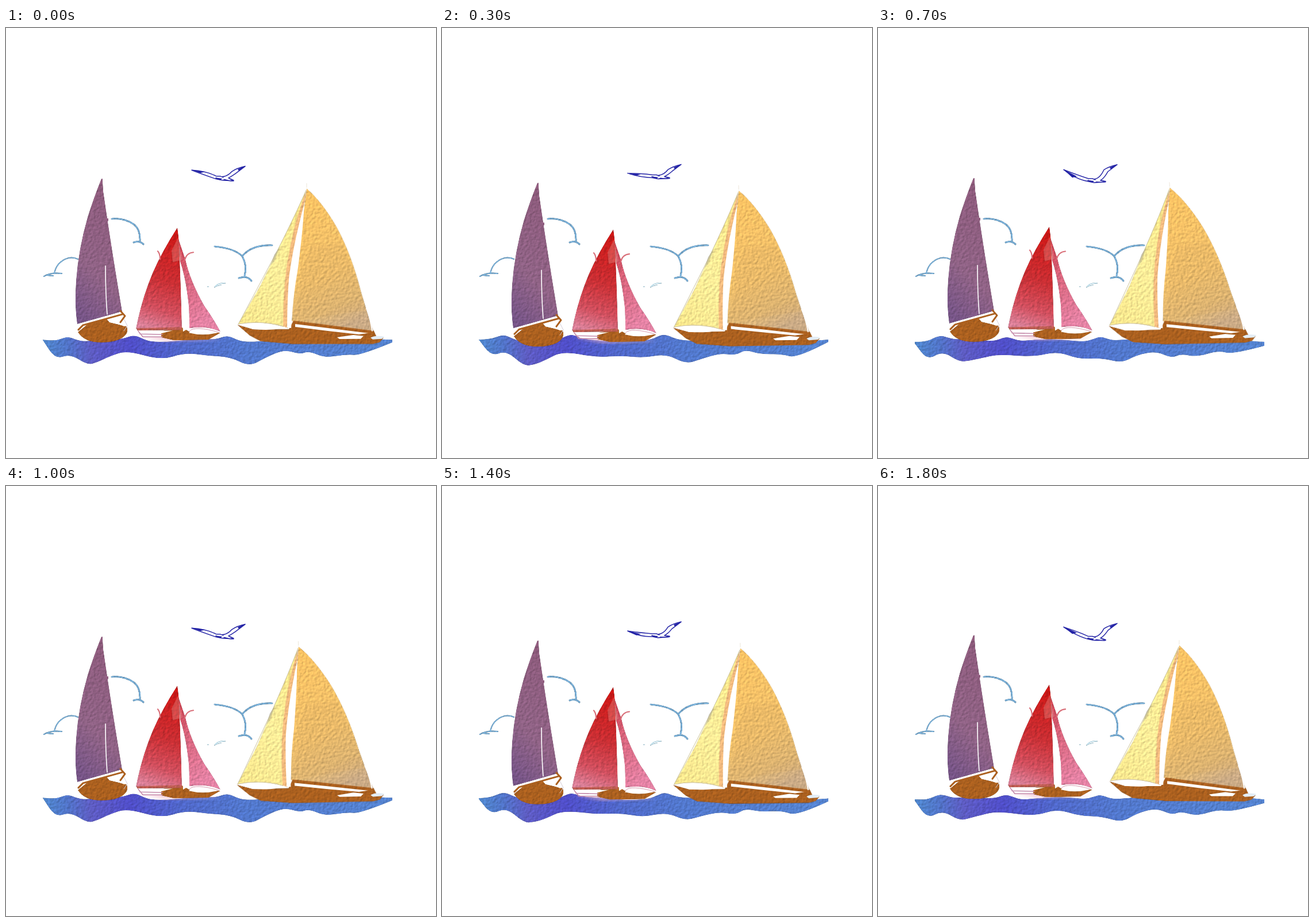
Recreate the animation shown at these times as an HTML page. Size 748x748 px, loop 1.9 s.

```html
<!DOCTYPE html>
<html lang="en">
<head>
<meta charset="utf-8">
<title>Sailing boats</title>
<style>
  html, body { margin: 0; width: 100%; height: 100%; overflow: hidden; background: #fff; }
  svg { display: block; width: 100vw; height: 100vh; }
  .line { fill: none; stroke-linecap: round; stroke-linejoin: round; }
  .gull { stroke: #76abd2; stroke-width: 3.2; }
  .wood { fill: #ab601f; }
  .spar { stroke: #ab601f; stroke-width: 3; }
  .white { fill: #fff; }
</style>
</head>
<body>
<svg viewBox="0 0 748 748">
  <defs>
    <filter id="grain" x="-2%" y="-2%" width="104%" height="104%" color-interpolation-filters="sRGB">
      <feTurbulence type="fractalNoise" baseFrequency=".2" numOctaves="2" seed="4"/>
      <feDiffuseLighting surfaceScale=".6" diffuseConstant=".92" lighting-color="#fff" result="light">
        <feDistantLight azimuth="225" elevation="55"/>
      </feDiffuseLighting>
      <feComposite in="SourceGraphic" in2="light" operator="arithmetic" k1="1.33"/>
      <feComposite in2="SourceAlpha" operator="in"/>
    </filter>
    <filter id="soft"><feGaussianBlur stdDeviation="3"/></filter>
    <linearGradient id="water" gradientUnits="userSpaceOnUse" x1="64" x2="672">
      <stop offset="0" stop-color="#5088ce"/>
      <stop offset=".07" stop-color="#5174c8"/>
      <stop offset=".14" stop-color="#5e5cc3"/>
      <stop offset=".25" stop-color="#504ec9"/>
      <stop offset=".4" stop-color="#5068ca"/>
      <stop offset=".58" stop-color="#5278cd"/>
      <stop offset="1" stop-color="#5584d1"/>
    </linearGradient>
    <linearGradient id="plum" x1=".6" y1="0" x2=".3" y2="1">
      <stop offset="0" stop-color="#8e5b7c"/>
      <stop offset=".65" stop-color="#906386"/>
      <stop offset="1" stop-color="#775587"/>
    </linearGradient>
    <linearGradient id="red" x1=".55" y1="0" x2=".4" y2="1">
      <stop offset="0" stop-color="#cb1715"/>
      <stop offset=".5" stop-color="#ca2f34"/>
      <stop offset=".8" stop-color="#d1505f"/>
      <stop offset="1" stop-color="#da8098"/>
    </linearGradient>
    <linearGradient id="pink" x1="0" y1="0" x2=".3" y2="1">
      <stop offset="0" stop-color="#cb3a47"/>
      <stop offset=".4" stop-color="#d8637a"/>
      <stop offset="1" stop-color="#e583a5"/>
    </linearGradient>
    <linearGradient id="gold" x1=".2" y1="0" x2=".45" y2="1">
      <stop offset="0" stop-color="#fcc463"/>
      <stop offset=".6" stop-color="#f0c06b"/>
      <stop offset=".85" stop-color="#dfb776"/>
      <stop offset="1" stop-color="#cbab86"/>
    </linearGradient>
    <linearGradient id="cream" x1="1" y1="0" x2="0" y2="1">
      <stop offset="0" stop-color="#fae486"/>
      <stop offset=".5" stop-color="#fcee9a"/>
      <stop offset="1" stop-color="#f8e68c"/>
    </linearGradient>
  </defs>

  <g class="line gull" filter="url(#grain)">
    <path d="M184 332Q206 330 223 342Q234 351 233 371M222 373Q232 369 239 376"/>
    <path d="M66 432Q77 425 97 427M71 430L82 431M84 427Q87 410 103 402Q114 397 125 402" stroke-width="2.4"/>
    <path d="M363 380Q397 383 411 397Q427 377 463 378M411 397Q420 414 415 431M405 435Q420 430 427 440"/>
    <path d="M363 451Q367 443 381 444M366 449L374 447M351 450h1" stroke="#c2e4f1" stroke-width="1.8"/>
  </g>

  <path id="bird" class="line" stroke="#2a2aa8" stroke-width="1.5"/>
  <path id="tips" fill="#2222a6"/>

  <path id="sea" fill="url(#water)" filter="url(#grain)"/>

  <g id="plumBoat">
    <g filter="url(#grain)">
      <path fill="url(#plum)" d="M166 263Q169 270 169 284Q176 332 185 390Q193 440 202 494L174 502L124 516Q119 485 122 440Q126 385 142 330Q153 295 166 263Z"/>
      <path class="wood" d="M125 530L141 517L174 506L180 513L210 520Q214 531 205 538Q193 548 166 548Q136 548 125 530Z"/>
    </g>
    <path class="line" d="M173 415Q173 460 176 499" stroke="#fff" stroke-width="1.6"/>
    <path class="white" d="M125 517L174 502L201 496L174 506L140 515L126 521Z"/>
    <path class="white" d="M178 509L199 503L209 518L206 520L186 513Z"/>
    <path class="line" d="M205 507L211 519L205 528" stroke="#d4ccd6" stroke-width="1"/>
    <path class="line spar" d="M126 526L134 518L174 507L203 499M199 493L207 502L199 513"/>
    <path class="line" d="M177 333v3M167 264v5" stroke="#8e5b7c" stroke-width="2"/>
  </g>

  <g id="redBoat">
    <path d="M232 534L275 530L350 537L372 540L280 544Z" fill="#eeb4c8" opacity=".6" filter="url(#soft)"/>
    <path class="white" d="M228 523L272 523V537L240 535Z"/>
    <g filter="url(#grain)">
      <path fill="url(#red)" d="M298 346Q300 358 301 374Q304 440 306 521L226 522Q236 470 255 425Q271 388 298 346Z"/>
      <path fill="url(#pink)" d="M300 366L312 401Q320 438 345 482Q362 506 373 527Q350 516 319 521Q319 455 303 405Z"/>
      <path class="wood" d="M270 526L307 520L319 527L373 529L352 541L292 542L270 537Z"/>
      <path d="M227 521L306 519V524L228 525Z" fill="#bd5c52"/>
    </g>
    <path d="M299 364L307 402L290 406L288 386Z" fill="#e79a96" opacity=".35"/>
    <path class="line" d="M264 387Q268 391 268 401M326 389Q314 390 311 402" stroke="#d9707a" stroke-width="2.2"/>
    <path class="white" d="M303 408Q311 430 318 482L319 520L308 527L305 470Z"/>
    <path class="white" d="M318 529Q327 515 368 529Q342 535 318 529ZM240 527L290 525L270 530Z"/>
    <path class="line" d="M230 526L238 536L272 536M233 531L272 532" stroke="#c48aaa" stroke-width="1.6"/>
    <path class="line" d="M319 526Q328 516 370 528" stroke="#d69cae" stroke-width="1"/>
  </g>

  <g id="goldBoat">
    <g filter="url(#grain)">
      <path fill="url(#cream)" d="M521 281Q504 321 472 385L442 447L404 514Q445 507 484 519L490 430Q500 350 521 281Z"/>
      <path fill="#f3bb7f" d="M521 283Q501 335 491 395Q482 440 482 518L491 521Q490 430 506 360L519 300Z"/>
      <path fill="url(#gold)" d="M522 278Q549 301 575 346Q601 394 618 460Q629 497 641 531L497 509Q501 420 513 350Z"/>
      <path fill="#d2a45f" opacity=".22" d="M530 378L583 374Q605 420 626 490L500 508Q510 435 530 378Z"/>
      <path class="wood" d="M402 515L430 523L492 523L500 508L640 526L645 537L657 538L650 546L638 549L500 549L443 544L424 534Z"/>
    </g>
    <path class="line" d="M521 281Q504 321 472 385L404 514" stroke="#c4b98a" stroke-width=".8"/>
    <path d="M477 378L466 405L460 411L466 393Z" fill="#9b9580" opacity=".4"/>
    <path class="white" d="M518 305Q516 350 507 420Q499 465 496 521L489 520Q489 470 492 432Q499 375 518 305Z"/>
    <path class="white" d="M406 514Q444 508 481 519Q472 526 430 523Z"/>
    <path class="line" d="M404 514Q445 507 482 518" stroke="#d0c4a0" stroke-width="1"/>
    <path class="white" d="M503 514L560 521L630 530L614 532L560 526L503 519Z"/>
    <path class="white" d="M576 537L604 533L622 535L617 540L580 540Z"/>
    <path class="line" d="M627 487Q634 505 637 526" stroke="#fff" stroke-width="2"/>
    <path d="M634 538Q642 533 658 536L654 540L638 541Z" fill="#e3edf6"/>
    <path class="line" d="M522 269v7" stroke="#ece6da" stroke-width="1"/>
  </g>
</svg>
<script>
const STEP = 100, FRAMES = 19, CYCLE = 10;
const LEFT = 64, RIGHT = 672, WAVELENGTH = 152;
const $ = id => document.getElementById(id);

// Swings around mid and peaks at the given step of the cycle.
const swing = (t, mid, size, peak, period = CYCLE) =>
  mid + size * Math.cos(2 * Math.PI * (t - peak) / period);

// Ripple that travels to the right along the water.
const ripple = (x, p, size) => swing(p, 0, size, CYCLE * (x - 115) / WAVELENGTH);

// Smooth curve that runs through the midpoints of a polyline.
function curve(pts) {
  let d = `L${pts[0]}`;
  for (let i = 1; i < pts.length - 1; i++) {
    const [x, y] = pts[i], [u, v] = pts[i + 1];
    d += `Q${x} ${y} ${(x + u) / 2} ${(y + v) / 2}`;
  }
  return d + `L${pts.at(-1)}`;
}

const hump = (x, at) => Math.exp(-(((x - at) / 16) ** 2));
const crest = x => 543.5 - 8 * (hump(x, 108) + hump(x, 224) + hump(x, 386));

// Lower edge of the water at rest, right to left.
const shore = [
  [RIGHT, 549], [617, 571], [592, 565], [555, 571], [527, 563], [511, 571], [484, 563],
  [450, 573], [424, 585], [390, 571], [350, 574], [312, 566], [270, 574], [210, 564],
  [180, 575], [160, 582], [142, 585], [112, 563], [86, 575], [LEFT, 545]
];

function drawSea(p) {
  const top = [];
  for (let x = LEFT; x <= RIGHT; x += 8) top.push([x, crest(x) + ripple(x, p, 2.2)]);
  const bottom = shore.map(([x, y]) => [x, y + ripple(x, p, 4)]);
  $('sea').setAttribute('d', 'M' + curve(top).slice(1) + curve(bottom) + 'Z');
}

function drawBird(p) {
  const l = swing(p, 249, 3.7, 3.3);
  const e = swing(p, 254, 5, 5.6);
  const r = swing(p, 238.3, 2.3, 9.9);
  const b = swing(p, 260.5, 3.5, 7.2);
  const tail = swing(p, 265, 3.4, 8);
  $('bird').setAttribute('d',
    `M323 ${l}Q348 ${e - 1} 366 ${b - 2}L373 ${b - 2}L378 ${b}` +
    `M323 ${l}Q344 ${e + 6} 366 ${b + 3}L376 ${b + 5}L396 ${tail}L387 ${b + 1}` +
    `M376 ${b - 1}Q386 ${b - 2} 393 ${r + 9}Q402 ${r + 3} 416 ${r}` +
    `Q404 ${r + 9} 400 ${r + 12}Q393 ${b - 2} 387 ${b + 1}L396 ${tail - 1}` +
    `M365 ${b + 1}L372 ${b + 3}`);
  $('tips').setAttribute('d',
    `M322 ${l - 1}Q334 ${(l + e) / 2} 346 ${e + 1}L338 ${e + 3}Z` +
    `M417 ${r - 1}L403 ${r + 5}L405 ${r + 8}Z` +
    `M364 ${b + 1}L376 ${b + 2}L373 ${b + 5}ZM396 ${tail + 1}L380 ${b + 3}L376 ${b + 5}Z`);
}

// Leans the big boat to the left while the bow dips.
function leanBoat(f, p) {
  const lean = swing(f, 6.5, 8.5, 8, FRAMES);
  const bob = swing(p, 2, 2.8, 2.9);
  const k = lean / 257;
  const b = (-0.4 * bob - 0.35 * lean) / 239;
  const c = (0.25 * lean + 120 * b) / 237;
  const m = [1, b, k, 1 + c, -535 * k, bob - 522 * b - 278 * c];
  $('goldBoat').setAttribute('transform', `matrix(${m})`);
}

const lift = (id, y) => $(id).setAttribute('transform', `translate(0 ${y})`);

let shown = -1;
function tick() {
  const f = Math.floor(performance.now() / STEP) % FRAMES;
  if (f !== shown) {
    shown = f;
    const p = f % CYCLE;
    drawSea(p);
    drawBird(p);
    lift('plumBoat', swing(p, 1.3, 5, 3.3));
    lift('redBoat', swing(p, 1.7, 2.5, 2.8));
    leanBoat(f, p);
  }
  requestAnimationFrame(tick);
}
tick();
</script>
</body>
</html>
```
